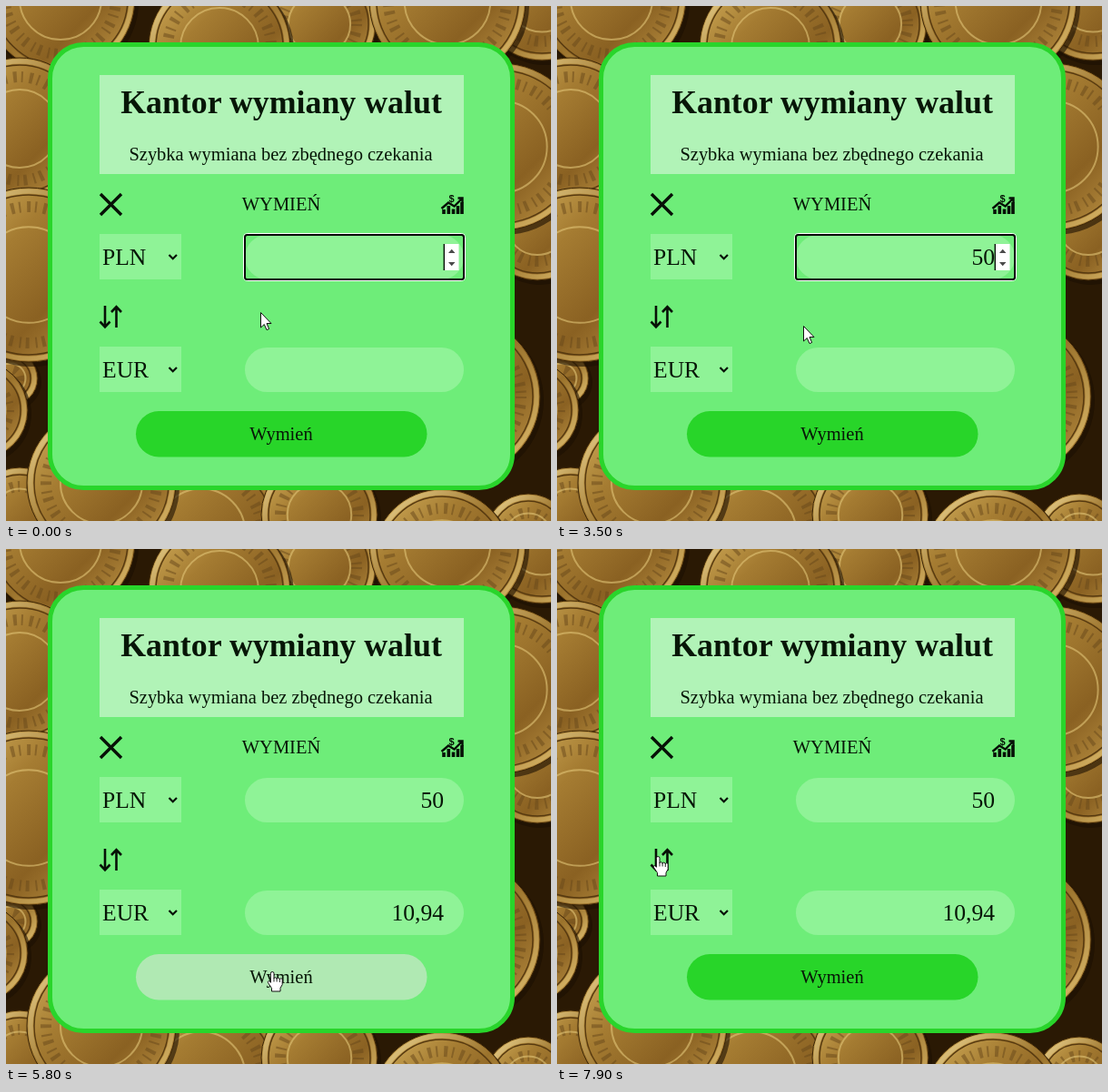
These frames come from a looping animation (600x567 px, 8 s). An HTML page:

```html
<!DOCTYPE html>
<html lang="pl">
<head>
<meta charset="utf-8">
<title>Kantor</title>
<style>
html, body { margin: 0; width: 100%; height: 100%; overflow: hidden; background: #2a1904; }
svg { display: block; width: 600px; height: 567px; }
text { font-family: "Liberation Serif", "Times New Roman", serif; font-size: 20.48px; fill: #071607; }
.big { font-size: 25.6px; }
.mid { text-anchor: middle; }
.end { text-anchor: end; }
.field { fill: #8ff397; }
.line { fill: none; stroke: #071107; }
.pointer { fill: #fff; stroke: #111; stroke-width: 1; stroke-linejoin: round; }
</style>
</head>
<body>
<svg viewBox="0 0 600 567">
  <defs>
    <linearGradient id="gold" x1="0" y1="0" x2="1" y2="1">
      <stop offset="0" stop-color="#d9b661"/>
      <stop offset=".35" stop-color="#a57c32"/>
      <stop offset=".65" stop-color="#8a6122"/>
      <stop offset="1" stop-color="#c89f4c"/>
    </linearGradient>
    <linearGradient id="rim" x1="0" y1="0" x2="1" y2="1">
      <stop offset="0" stop-color="#f0d893"/>
      <stop offset=".5" stop-color="#9a722b"/>
      <stop offset="1" stop-color="#e3c272"/>
    </linearGradient>
  </defs>

  <g id="coins"></g>

  <rect x="48.5" y="42.5" width="509" height="488" rx="37" fill="#6eed79" stroke="#29d52b" stroke-width="5"/>
  <rect x="103" y="76" width="401" height="109" fill="#b1f3b7"/>
  <text class="mid" x="303" y="118" style="font-size:35.84px;font-weight:bold">Kantor wymiany walut</text>
  <text class="mid" x="302.5" y="170">Szybka wymiana bez zbędnego czekania</text>

  <path class="line" stroke-width="3.4" d="M104 207L127 230M127 207L104 230"/>
  <text class="mid" x="303" y="225">WYMIEŃ</text>

  <g id="chart">
    <path class="line" stroke-width="2.4" d="M479.5 223L487 216.5L493.5 220.5L502 212M497.500 211.500H502.500V216.500"/>
    <path class="line" stroke-width="3.6" d="M482 229V224M487.300 229V220M492.500 229V223.500M497.500 229V220M502 229V216"/>
    <text class="mid" x="490.500" y="216" style="font:bold 11px 'Liberation Sans',sans-serif">$</text>
  </g>

  <rect class="field" x="103" y="251" width="90" height="50"/>
  <text class="big" x="106" y="285">PLN</text>
  <rect class="field" x="103" y="375" width="90" height="50"/>
  <text class="big" x="106" y="409">EUR</text>
  <path class="line" stroke-width="2.2" d="M179.500 274L183.700 278.200L188 274M179.500 398L183.700 402.200L188 398"/>

  <path class="line" stroke-width="2.6" d="M109 330V353M103.500 347.500L109 353.300L114.500 347.500M121.500 354V331M116 337L121.500 331.200L127 337"/>

  <rect class="field" x="263" y="252" width="241" height="49" rx="24.500"/>
  <rect class="field" x="263" y="376" width="241" height="49" rx="24.500"/>
  <g id="ring" fill="none">
    <rect x="261.500" y="250.500" width="244" height="52" rx="4" stroke="#fff"/>
    <rect x="263" y="252" width="241" height="49" rx="2.500" stroke="#080808" stroke-width="2"/>
  </g>
  <g id="spinner">
    <rect x="483" y="262" width="15.500" height="29" fill="#fff"/>
    <path d="M487 272L490.700 267.700L494.500 272ZM487 282L490.700 286.200L494.500 282Z" fill="#4a4a4a"/>
  </g>
  <path id="caret" class="line" stroke-width="1.4" d="M482.300 262V291"/>
  <text id="amount" class="big end" x="482" y="285"></text>
  <text id="result" class="big end" x="482" y="409"></text>

  <rect id="button" x="143" y="446" width="320.500" height="50.500" rx="25.200"/>
  <text class="mid" x="303" y="478">Wymień</text>

  <g id="cursor">
    <path id="arrow" class="pointer" d="M.5 .5V17L4.300 13.500L7 19.600L9.600 18.500L7 12.500H12Z"/>
    <path id="beam" class="line" stroke-width="1.200" d="M-3.500 -8.500H-1Q0 -8.500 0 -7V7Q0 8.500 -1 8.500H-3.500M3.500 -8.500H1Q0 -8.500 0 -7M0 7Q0 8.500 1 8.500H3.500"/>
    <g id="hand" transform="translate(-5)">
      <path class="pointer" d="M5.200 .5Q3.400 .5 3.400 2.300V12.300L2.400 11.200C1.200 9.900-.3 11.200.6 12.700L4.500 18.500V22H14V18.500L16.200 14.500V9.500C16.200 7.300 13.500 7.300 13.300 8.900C13.100 6.700 10.300 6.700 10.100 8.300C9.900 6.300 7.100 6.300 7 7.800V2.300Q7 .5 5.200 .5Z"/>
      <path class="line" stroke-width=".9" d="M7 7.500V11.500M10.100 8V11.500M13.300 8.800V12"/>
    </g>
  </g>
</svg>

<script>
const LOOP = 8000, STEP = 100;
const $ = id => document.getElementById(id);

// x, y, radius; later coins lie on top
const coins = [
  [345, 20, 62], [590, -10, 70], [585, 240, 62], [5, 410, 30],
  [235, 45, 78], [60, -8, 82], [486, -5, 86], [15, 135, 78],
  [545, 155, 92], [25, 296, 96], [-30, 445, 54], [500, 430, 88],
  [15, 560, 52], [215, 580, 88], [345, 560, 64], [105, 525, 82],
  [575, 585, 48], [480, 608, 76]
];
const ring = (x, y, r, attrs) => `<circle cx="${x}" cy="${y}" r="${r}" ${attrs}/>`;
$('coins').innerHTML = coins.map(([x, y, r]) =>
  ring(x + 3, y + 4, r + 1, 'fill="#1c1002" opacity=".6"') +
  ring(x, y, r, 'fill="url(#gold)" stroke="#3a2406"') +
  ring(x, y, r - 4, 'fill="none" stroke="url(#rim)" stroke-width="5"') +
  ring(x, y, r - 8, 'fill="none" stroke="#573a10" stroke-width="1.5"') +
  ring(x, y, r - 21, 'fill="none" stroke="#68481a" stroke-width="12" stroke-dasharray="2 7 4 5" opacity=".5"') +
  ring(x, y, r * .55, 'fill="none" stroke="#e2c577" stroke-width="2" opacity=".6"')
).join('');

// time, pointer x, pointer y
const path = [
  [0, 280, 337], [500, 282, 334], [900, 327, 275], [1500, 327, 275],
  [2200, 271, 352], [3700, 271, 352], [4400, 299, 442], [4600, 299, 442],
  [5000, 293, 465], [5900, 293, 465], [6500, 271, 446], [7400, 111, 338], [LOOP, 111, 338]
];

function pointerAt(t) {
  const i = path.findIndex(p => p[0] > t);
  const [t0, x0, y0] = path[i - 1], [t1, x1, y1] = path[i];
  const k = (t - t0) / (t1 - t0), e = k * k * (3 - 2 * k);
  return [x0 + (x1 - x0) * e, y0 + (y1 - y0) * e];
}

const show = (id, on) => $(id).style.display = on ? '' : 'none';

function draw(t) {
  const [x, y] = pointerAt(t);
  const over = (l, top, r, b) => x >= l && x <= r && y >= top && y <= b;
  const onButton = over(143, 446, 463, 497);
  const onInput = over(263, 252, 504, 301);
  const onSwap = over(103, 329, 128, 355);
  const focus = t < 600 || t >= 1400 && t < 5200;
  const lastKey = [3200, 2900, 1400, 0].find(k => k <= t);

  show('ring', focus);
  show('spinner', focus || onInput);
  show('caret', focus && Math.floor((t - lastKey) / 500) % 2 === 0);
  $('amount').textContent = t < 2900 ? '' : t < 3200 ? '5' : '50';
  $('result').textContent = t < 5200 ? '' : '10,94';
  $('button').setAttribute('fill', onButton ? '#b0e9b3' : '#28d529');

  $('cursor').setAttribute('transform', `translate(${Math.round(x)} ${Math.round(y)})`);
  show('hand', onButton || onSwap);
  show('beam', onInput);
  show('arrow', !onButton && !onSwap && !onInput);
}

const start = performance.now();
function tick() {
  const t = (performance.now() - start) % LOOP;
  draw(Math.floor(t / STEP) * STEP);
  requestAnimationFrame(tick);
}
tick();
</script>
</body>
</html>
```
